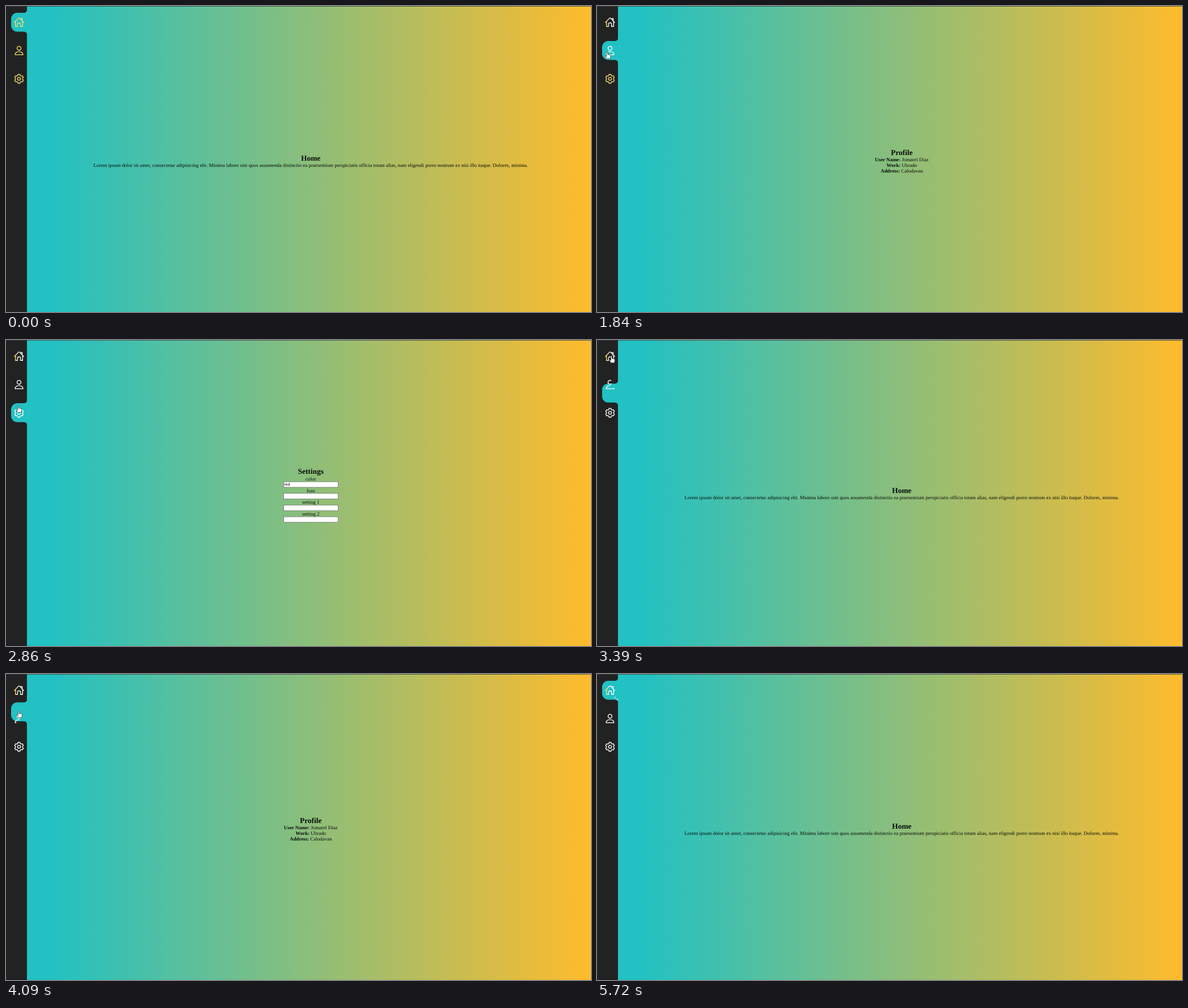
An HTML page that plays this animation: 1033 px wide and 542 px high, repeating every 6.11 s.

```html
<!DOCTYPE html>
<html lang="en">
<head>
<meta charset="utf-8">
<title>Sidebar menu</title>
<style>
  html, body { margin: 0; width: 100%; height: 100%; overflow: hidden; background: #212322; }
  svg { display: block; width: 1033px; height: 542px; }
  text { font: 8.93px "Liberation Serif", "Times New Roman", serif; text-anchor: middle; text-rendering: geometricPrecision; fill: #080c0a; }
  .title { font-size: 13.4px; font-weight: bold; }
  .bold { font-weight: bold; }
  .value { font: 7.2px "Liberation Sans", Arial, sans-serif; text-anchor: start; fill: #111; }
  .icon { fill: none; stroke-width: 1.35; stroke-linecap: round; stroke-linejoin: round; }
  .field { fill: #fff; stroke: #767676; stroke-width: .8; }
  .cursor { fill: #fff; stroke: #222; stroke-width: .7; stroke-linejoin: round; }
</style>
</head>
<body>
<svg viewBox="0 0 1033 542">
  <defs>
    <linearGradient id="page" gradientUnits="userSpaceOnUse" x1="76" y1="0" x2="1026" y2="0">
      <stop stop-color="#22c1c3"/><stop offset="1" stop-color="#fdbb2d"/>
    </linearGradient>
    <linearGradient id="mix" gradientUnits="userSpaceOnUse" x1="15" y1="0" x2="31" y2="0">
      <stop offset=".12" stop-color="#f8dc68"/><stop offset=".4" stop-color="#fff"/>
    </linearGradient>
  </defs>
  <rect width="37" height="542" fill="#212322"/>
  <rect x="37" width="996" height="542" fill="url(#page)"/>
  <rect width="1033" height="1" fill="#34403b" opacity=".8"/>
  <path id="bubble" fill="#22c1c3" d="M37.5-6C37-2 35 0 31 0H20A11 11 0 0 0 9 11V22.5A11 11 0 0 0 20 33.5H31C35 33.5 37 35.5 37.5 39.5Z"/>

  <g id="home" class="icon">
    <path d="M14.8 29.2L22 21.6Q23 20.6 24 21.6L31.2 29.2M26.3 22.2H28.6V26"/>
    <path d="M16.8 27.5V36.2H20.4V31.5Q20.4 30 21.9 30H24.1Q25.6 30 25.6 31.5V36.2H29.3V27.5"/>
  </g>
  <g id="person" class="icon">
    <path id="head"/>
    <path id="body" pathLength="100" d="M23 80.9C18.6 80.9 16.2 83.4 16 86.3H30C29.8 83.4 27.4 80.9 23 80.9"/>
  </g>
  <g id="gear" class="icon"><path id="teeth"/><circle cx="23" cy="129" r="2.6"/></g>

  <g id="pages">
    <g>
      <text class="title" x="538.2" y="273.9">Home</text>
      <text x="538.2" y="285">Lorem ipsum dolor sit amet, consectetur adipisicing elit. Minima labore sint quos assumenda distinctio ea praesentium perspiciatis officia totam alias, nam eligendi porro nostrum ex nisi illo itaque. Dolores, minima.</text>
    </g>
    <g>
      <text class="title" x="538.2" y="263.8">Profile</text>
      <text x="538.2" y="275"><tspan class="bold">User Name:</tspan> Jomarel Diaz</text>
      <text x="538.2" y="285"><tspan class="bold">Work:</tspan> Ubrado</text>
      <text x="538.2" y="295"><tspan class="bold">Address:</tspan> Calodavan</text>
    </g>
    <g id="settings"><text class="title" x="538.2" y="237.4">Settings</text></g>
  </g>

  <g id="speck">
    <path d="M30.5 40.5l2.5 2" stroke="#dfe9e6" stroke-width="1.2"/>
    <path d="M33 44l4.5 1.5" stroke="#b9cfcb" stroke-width="1.6"/>
  </g>
  <g id="cursor" class="cursor">
    <path id="hand" d="M-1 .8Q0-.7 1 .8V5L3 5.2 5 5.8Q6.2 6.2 6 8L5.2 12.4H-.8L-3.5 8.3Q-3.6 6.9-2.4 7.2L-1 8.4Z"/>
    <path id="arrow" d="M0 0V8.4L1.9 6.7 3.2 9.5 4.6 8.9 3.3 6.1H5.8Z"/>
  </g>
</svg>
<script>
const LOOP = 6110, SLIDE = 300, DROP = 140;
const YELLOW = '#f8dc68', WHITE = '#fff', MIX = 'url(#mix)';
const $ = id => document.getElementById(id);
const set = (el, name, value) => el.setAttribute(name, value);
const show = (el, on) => set(el, 'visibility', on ? 'visible' : 'hidden');

// time, page shown
const clicks = [[0, 0], [1490, 1], [2497, 2], [3324, 0], [3952, 1], [4478, 0]];

// time, x, y, shape of the pointer up to the next stop
const stops = [
  [240, 1016, 533, 'arrow'], [690, 34, 66, ''], [970, -3, 60, 'arrow'],
  [1150, 11, 71, 'hand'], [1310, 18, 81, 'hand'], [2130, 18, 81, 'hand'],
  [2480, 21.5, 122, 'hand'], [2790, 21.5, 122, 'hand'], [3250, 25.5, 28, 'hand'],
  [3640, 25.5, 28, 'hand'], [3950, 22.5, 65, 'hand'], [4150, 22.5, 65, 'hand'],
  [4450, 27, 27, 'hand'], [4520, 30, 31, 'arrow'], [4560, 31, 32.5, 'arrow'],
  [4790, 30, 40, 'arrow'], [4940, 30, 40, 'arrow'], [5490, 952, 533, 'arrow'],
  [5570, 952, 533, 'arrow'], [5720, 990, 546, '']
];

// time, head arc start and end in degrees, share of the shoulders drawn
const sketch = [
  [0, 0, 359.9, 100], [2497, -100, 205, 100], [2650, 0, 359.9, 100],
  [3324, 55, 300, 74], [3430, 0, 359.9, 100], [3952, 60, 290, 35],
  [4150, 0, 359.9, 100], [4478, 30, 290, 72], [4640, 0, 359.9, 100]
];

const tints = {
  home: [[0, YELLOW], [1510, MIX]],
  person: [[0, YELLOW], [1510, WHITE]],
  gear: [[0, YELLOW], [2400, MIX], [2650, WHITE]]
};

const indexAt = (table, t) => table.findLastIndex(row => row[0] <= t);
const at = (table, t) => table[indexAt(table, t)];
const mix = (a, b, p) => a + (b - a) * p;
const polar = (cx, cy, r, deg) => {
  const a = deg * Math.PI / 180;
  return (cx + r * Math.cos(a)).toFixed(2) + ' ' + (cy + r * Math.sin(a)).toFixed(2);
};

// CSS "ease" curve
function ease(x) {
  if (x <= 0) return 0;
  if (x >= 1) return 1;
  let lo = 0, hi = 1, u = .5;
  for (let i = 0; i < 20; i++) {
    u = (lo + hi) / 2;
    const bx = .75 * u * (1 - u) + u ** 3;
    if (bx < x) lo = u; else hi = u;
  }
  return .3 * u * (1 - u) ** 2 + 3 * u * u * (1 - u) + u ** 3;
}

const rim = [];
for (let a = -90; a < 270; a += 60)
  for (const [d, r] of [[-22, 6.2], [-13, 8], [13, 8], [22, 6.2]]) rim.push(polar(23, 129, r, a + d));
set($('teeth'), 'd', 'M' + rim.join('L') + 'Z');

$('settings').innerHTML += ['color', 'font', 'setting 1', 'setting 2'].map((label, i) => {
  const y = 248.9 + i * 20.65;
  return `<text x="538.2" y="${y}">${label}</text>
    <rect class="field" x="490.4" y="${y + 2.2}" width="96" height="9.8"/>` +
    (i ? '' : `<text class="value" x="491.2" y="${y + 9.5}">red</text>`);
}).join('');

const pages = [...$('pages').children];

function drawMenu(t) {
  const i = indexAt(clicks, t), [start, page] = clicks[i];
  const from = i ? clicks[i - 1][1] : page;
  const y = 12 + 50 * mix(from, page, ease((t - start) / SLIDE));
  set($('bubble'), 'transform', `translate(0 ${y})`);
  const lift = i ? -13 * (1 - ease((t - start) / DROP)) : 0;
  pages.forEach((el, n) => {
    show(el, n === page);
    set(el, 'transform', `translate(0 ${lift})`);
  });
}

function drawIcons(t) {
  for (const id in tints) set($(id), 'stroke', at(tints[id], t)[1]);
  const [, a, b, share] = at(sketch, t);
  set($('head'), 'd', `M${polar(23, 74.9, 3.5, a)}A3.5 3.5 0 ${b - a > 180 ? 1 : 0} 1 ${polar(23, 74.9, 3.5, b)}`);
  set($('body'), 'stroke-dasharray', share < 100 ? `${share} 200` : 'none');
}

function drawCursor(t) {
  const i = indexAt(stops, t), a = stops[i], b = stops[i + 1];
  const shape = a ? a[3] : '';
  show($('hand'), shape === 'hand');
  show($('arrow'), shape === 'arrow');
  show($('speck'), t >= 5010);
  if (!shape) return;
  let p = (t - a[0]) / (b[0] - a[0]);
  p = p * p * (3 - 2 * p);
  set($('cursor'), 'transform', `translate(${mix(a[1], b[1], p)} ${mix(a[2], b[2], p)})`);
}

function frame() {
  const t = performance.now() % LOOP;
  drawMenu(t);
  drawIcons(t);
  drawCursor(t);
  requestAnimationFrame(frame);
}
frame();
</script>
</body>
</html>
```
